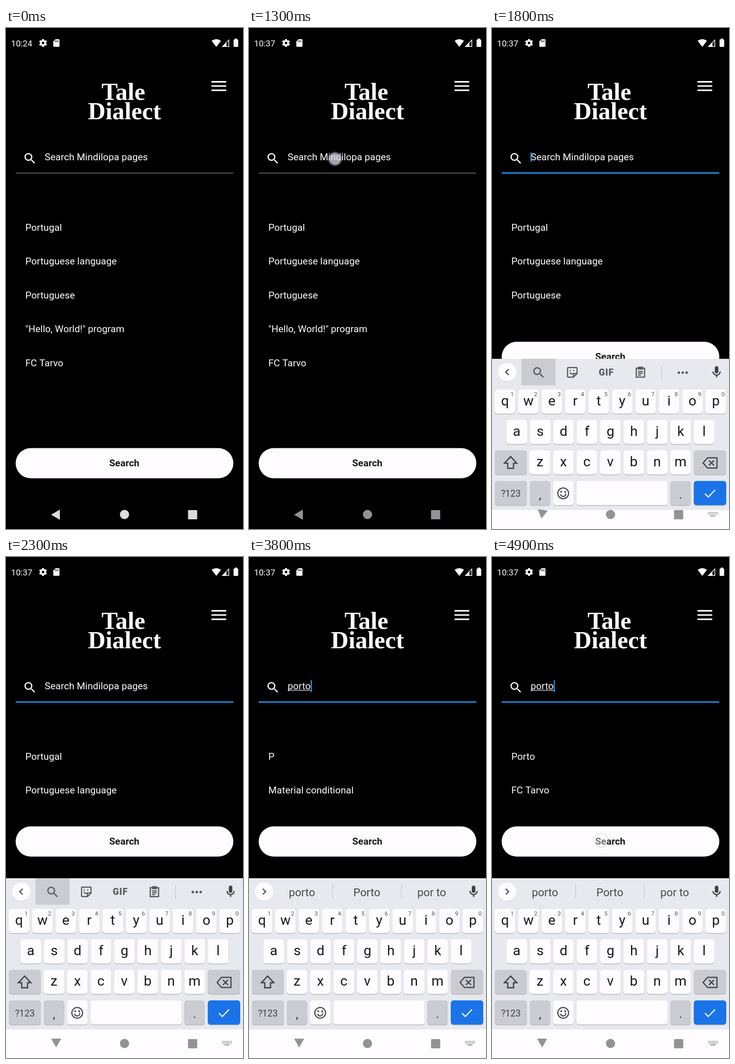
Animation, 515 px wide and 1087 px high, one loop 5 s. Source, as an HTML page with a canvas:

```html
<!DOCTYPE html>
<html lang="en">
<head>
<meta charset="utf-8">
<title>Search screen</title>
<style>
html, body { margin: 0; width: 100%; height: 100%; overflow: hidden; background: #000; }
canvas { display: block; width: 515px; height: 1087px; }
</style>
</head>
<body>
<canvas id="stage"></canvas>
<script>
const W = 515, H = 1087, LOOP = 5000, STEP = 100;
const canvas = document.getElementById('stage');
const c = canvas.getContext('2d');
const ratio = window.devicePixelRatio || 1;
canvas.width = W * ratio;
canvas.height = H * ratio;

const WHITE = '#fefcff', INK = '#3f4246', BLUE = '#2196f3', SPECIAL = '#cbccd2';
const BODY_BOTTOM = 1024, KEYBOARD_TOP = 697, KEY_H = 52.5;

const ICONS = {
  search: 'M15.5 14h-.79l-.28-.27A6.47 6.47 0 0 0 16 9.5 6.5 6.5 0 1 0 9.5 16c1.61 0 3.09-.59 4.23-1.57l.27.28v.79l5 4.99L20.49 19zm-6 0a4.5 4.5 0 1 1 0-9 4.5 4.5 0 0 1 0 9z',
  mic: 'M12 14a3 3 0 0 0 3-3V5a3 3 0 0 0-6 0v6a3 3 0 0 0 3 3zm5-3a5 5 0 0 1-10 0H5c0 3.53 2.61 6.43 6 6.92V21h2v-3.08c3.39-.49 6-3.39 6-6.92z',
  sticker: 'M5 4H19A1 1 0 0 1 20 5V14L14 20H5A1 1 0 0 1 4 19V5A1 1 0 0 1 5 4zM14 20V14H20M8 12Q10 16 13 14M8.5 8v2M14.5 8v2',
  clipboard: 'M5 5H19V20H5zM9 3.5h6v3H9zM8 10.5h8M8 13.5h8M8 16.5h5',
  shift: 'M12 4 3.5 13H8V20H16V13H20.5z',
  backspace: 'M9 5H22V19H9L3 12zM11 8.5l7 7M18 8.5l-7 7',
  check: 'M4.5 12.5l5 5L19.5 7',
  left: 'M14.5 7l-5 5 5 5',
  right: 'M9.5 7l5 5-5 5',
  sd: 'M10 2h8a2 2 0 0 1 2 2v16a2 2 0 0 1-2 2H6a2 2 0 0 1-2-2V8z'
};

function text(str, x, y, size, color, align = 'left', weight = 400, family = 'Roboto, sans-serif') {
  c.font = `${weight} ${size}px ${family}`;
  c.textAlign = align;
  c.fillStyle = color;
  c.fillText(str, x, y);
}

function rect(x, y, w, h, color, r = 0) {
  c.fillStyle = color;
  c.beginPath();
  c.roundRect(x, y, w, h, r);
  c.fill();
}

function circle(x, y, r, color) {
  c.fillStyle = color;
  c.beginPath();
  c.arc(x, y, r, 0, 7);
  c.fill();
}

function poly(points, color) {
  c.fillStyle = color;
  c.beginPath();
  points.forEach(p => c.lineTo(...p));
  c.fill();
}

// Icons live in a 24-unit box; a line width draws the outline instead of a fill.
function icon(name, x, y, size, color, line) {
  const path = new Path2D(ICONS[name]);
  c.save();
  c.translate(x - size / 2, y - size / 2);
  c.scale(size / 24, size / 24);
  c.fillStyle = c.strokeStyle = color;
  c.lineWidth = line;
  if (line) c.stroke(path); else c.fill(path);
  c.restore();
}

// Eased progress on cubic-bezier(.4, 0, .2, 1).
function ease(t, start, duration) {
  const x = Math.min(1, Math.max(0, (t - start) / duration));
  let lo = 0, hi = 1, s = 0.5;
  for (let i = 0; i < 24; i++) {
    s = (lo + hi) / 2;
    const bx = 1.2 * (1 - s) ** 2 * s + 0.6 * (1 - s) * s * s + s ** 3;
    if (bx < x) lo = s; else hi = s;
  }
  return 3 * (1 - s) * s * s + s ** 3;
}

// Value of the last [time, value] entry already reached.
const at = (t, track) => track.filter(e => e[0] <= t).pop()[1];

const QUERY = [[0, ''], [2700, 'p'], [2900, 'po'], [3100, 'por'], [3300, 'port'], [3500, 'porto']];
const RESULTS = [
  [0, ['Portugal', 'Portuguese language', 'Portuguese', '"Hello, World!" program', 'FC Tarvo']],
  [2700, []],
  [3400, ['P', 'Material conditional']],
  [4100, ['Porto', 'FC Tarvo']]
];
const SUGGESTIONS = [
  [0, null],
  [2800, ['p', 'please', 'pic']],
  [3000, ['po', 'pop', 'post']],
  [3200, ['por', 'for', 'port']],
  [3400, ['port', 'Port', 'ports']],
  [3600, ['porto', 'Porto', 'por to']]
];
const CURSOR = [[0, false], [1500, true], [2200, false], [2700, true], [4000, false], [4500, true]];
// [from, to, x, y, opacity]
const TOUCHES = [
  [1300, 1500, 187, 284, 0.75], [2500, 2700, 487, 791, 0.75], [2800, 2900, 436, 791, 0.75],
  [3000, 3100, 180, 791, 0.75], [3200, 3300, 231, 791, 0.75], [3400, 3500, 436, 791, 0.75],
  [4900, 5000, 237, 615, 0.4]
];

function statusBar(t) {
  text(t < 100 ? '10:24' : '10:37', 11, 39.5, 18.5, WHITE);
  c.strokeStyle = WHITE;
  c.lineWidth = 4;
  c.beginPath();
  c.arc(80.5, 32.5, 4.7, 0, 7);
  c.stroke();
  for (let i = 0; i < 6; i++) {
    c.save();
    c.translate(80.5, 32.5);
    c.rotate(i * Math.PI / 3);
    rect(-2.2, -8.6, 4.4, 3.5, WHITE, 0.5);
    c.restore();
  }
  icon('sd', 109.5, 32.5, 20, WHITE);
  for (let i = 0; i < 3; i++) rect(106.5 + i * 3, 27, 1.4, 3.5, '#000');
  c.fillStyle = WHITE;
  c.beginPath();
  c.moveTo(457, 41);
  c.lineTo(447, 28);
  c.quadraticCurveTo(457, 20.5, 467, 28);
  c.fill();
  c.strokeStyle = WHITE;
  c.lineWidth = 1.5;
  c.beginPath();
  c.moveTo(484.2, 26);
  c.lineTo(484.2, 40.2);
  c.lineTo(470.5, 40.2);
  c.closePath();
  c.stroke();
  poly([[469, 41], [479, 31], [479, 41]], WHITE);
  rect(494.5, 25, 10, 16, WHITE, 1.5);
  rect(497, 23, 5, 3, WHITE);
}

function searchField(t) {
  const query = at(t, QUERY), focused = t >= 1500;
  icon('search', 52, 283, 31.6, WHITE);
  text(query || 'Search Mindilopa pages', 84, 287, 21, WHITE);
  const width = query ? c.measureText(query).width : 0;
  if (query) rect(84, 288.5, width, 1.3, WHITE);
  if (at(t, CURSOR)) {
    if (query) rect(84 + width, 267, 2.5, 26, BLUE);
    else rect(83.7, 270, 2.6, 20, BLUE);
  }
  if (focused) rect(21, 313.3, 473, 2.6, BLUE);
  else rect(21, 314.1, 473, 1.4, '#777');
}

function page(t) {
  text('Tale', 255, 156, 53, WHITE, 'center', 700, '"Liberation Serif", serif');
  text('Dialect', 257.5, 198, 53, WHITE, 'center', 700, '"Liberation Serif", serif');
  for (let i = 0; i < 3; i++) rect(446.5, 115 + i * 9.2, 32, 3.4, WHITE);
  searchField(t);

  const bottom = BODY_BOTTOM - (BODY_BOTTOM - KEYBOARD_TOP) * ease(t, 1671.5, 285);
  const top = bottom - 112.5;
  c.save();
  c.beginPath();
  c.rect(0, 320, W, top - 47 - 320);
  c.clip();
  at(t, RESULTS).forEach((row, i) => text(row, 42, 440 + i * 73.4, 21, WHITE));
  c.restore();
  rect(21, top, 473, 65.5, WHITE, 32.75);
  text('Search', 257, top + 39.5, 21, '#1b1a1d', 'center', 700);
}

function key(x, y, w, label, color = WHITE) {
  rect(x, y + 1.5, w, KEY_H, '#b3b5bb', 6);
  rect(x, y, w, KEY_H, color, 6);
  if (label) text(label, x + w / 2, y + 34.5, 30, '#17181a', 'center');
}

function toolbar(suggestions) {
  circle(33, 727.3, 20, '#d3d5da');
  if (suggestions) {
    circle(33, 726, 20, WHITE);
    icon('right', 33, 726, 30, INK, 1.9);
    suggestions.forEach((word, i) => text(word, 115 + i * 141, 736, 24, '#46494e', 'center'));
    for (const x of [181, 330.5]) rect(x, 711, 1.2, 30, '#c3c5ca');
  } else {
    rect(64, 697, 74, 57.5, '#cbccd1');
    circle(33, 726, 20, WHITE);
    icon('left', 33, 726, 30, INK, 1.9);
    icon('search', 101.5, 727, 31.6, '#55585d');
    icon('sticker', 174.5, 726.5, 31, '#55585d', 1.9);
    c.letterSpacing = '1px';
    text('GIF', 248.5, 733, 19.5, '#55585d', 'center', 800);
    c.letterSpacing = '0px';
    icon('clipboard', 322.5, 726.5, 31, '#55585d', 2);
    rect(367.7, 712, 1.2, 29, '#c3c5ca');
    for (const x of [406, 414.5, 423]) circle(x, 727, 2.7, '#55585d');
  }
  icon('mic', 488, 726, 31, INK);
}

function keyboard(t) {
  const shift = (H - KEYBOARD_TOP) * (1 - ease(t, 1595, 285));
  c.save();
  c.translate(0, shift);
  rect(0, KEYBOARD_TOP, W, H, '#e7e9ee');
  rect(0, 1025, W, 70, WHITE);
  toolbar(at(t, SUGGESTIONS));

  [...'qwertyuiop'].forEach((ch, i) => {
    const x = 6 + i * 50.9;
    key(x, 763.5, 44.5, ch);
    text((i + 1) % 10, x + 38, 778, 13, '#55585d', 'center');
  });
  [...'asdfghjkl'].forEach((ch, i) => key(31.5 + i * 50.9, 829.5, 44.5, ch));
  [...'zxcvbnm'].forEach((ch, i) => key(82 + i * 50.9, 895.5, 44.5, ch));
  key(6, 895.5, 70, '', SPECIAL);
  icon('shift', 40.5, 922, 38, INK, 1.7);
  key(438.5, 895.5, 70.5, '', SPECIAL);
  icon('backspace', 473, 923, 38, INK, 1.6);

  key(6, 962, 70, '', SPECIAL);
  text('?123', 41, 996.5, 20, INK, 'center');
  key(82, 962, 44.5, '', SPECIAL);
  text(',', 104.5, 1001, 25, '#222', 'center');
  key(132.9, 962, 44.5);
  c.strokeStyle = INK;
  c.lineWidth = 2.3;
  c.beginPath();
  c.arc(154.7, 989, 11.7, 0, 7);
  c.moveTo(160.4, 991.2);
  c.arc(154.7, 990, 5.8, 0.2, Math.PI - 0.2);
  c.stroke();
  circle(150.5, 985.5, 1.9, INK);
  circle(159, 985.5, 1.9, INK);
  key(183.5, 962, 198);
  key(387.5, 962, 44.5, '', SPECIAL);
  text('.', 409.8, 1000, 25, '#222', 'center');
  key(438.5, 962, 70.5, '', '#1a73e8');
  icon('check', 473.7, 989, 35, WHITE, 1.7);
  c.restore();
}

function navigation(t) {
  const turn = ease(t, 1620, 285);
  const color = t < 100 ? '#dcdadd' : '#949296';
  c.save();
  c.translate(109, 1056 - 3 * turn);
  c.rotate(-turn * Math.PI / 2);
  poly([[-11, 0], [8, -11], [8, 11]], color);
  c.restore();
  circle(257.5, 1055.5, 10, color);
  rect(395.5, 1046, 20, 20, color, 1.5);
  if (t < 1700) return;
  c.globalAlpha = turn;
  for (let i = 0; i < 12; i++) rect(470 + i % 6 * 3.6, 1050 + Math.floor(i / 6) * 3.6, 2.3, 2.3, color);
  rect(474.5, 1057.5, 11, 2.3, color);
  c.globalAlpha = 1;
}

function touch(x, y, opacity) {
  const glow = c.createRadialGradient(x, y, 0, x, y, 17);
  glow.addColorStop(0, `rgba(225,225,230,${opacity})`);
  glow.addColorStop(0.68, `rgba(215,215,222,${opacity})`);
  glow.addColorStop(0.8, `rgba(150,150,175,${opacity * 0.75})`);
  glow.addColorStop(1, 'rgba(110,110,150,0)');
  if (y !== 615) return circle(x, y, 17, glow);
  circle(x, y, 14, `rgba(254,252,255,${opacity})`);
  c.strokeStyle = 'rgba(120,120,130,.2)';
  c.lineWidth = 2;
  c.beginPath();
  c.arc(x, y, 15, 0, 7);
  c.stroke();
}

function draw(t) {
  c.setTransform(ratio, 0, 0, ratio, 0, 0);
  rect(0, 0, W, H, '#000');
  statusBar(t);
  page(t);
  if (t >= 1600) keyboard(t);
  navigation(t);
  for (const [from, to, x, y, opacity] of TOUCHES) {
    if (t >= from && t < to) touch(x, y, opacity);
  }
}

const origin = performance.now();
function tick() {
  const time = (performance.now() - origin) % LOOP;
  draw(Math.floor(time / STEP) * STEP);
  requestAnimationFrame(tick);
}
tick();
</script>
</body>
</html>
```
